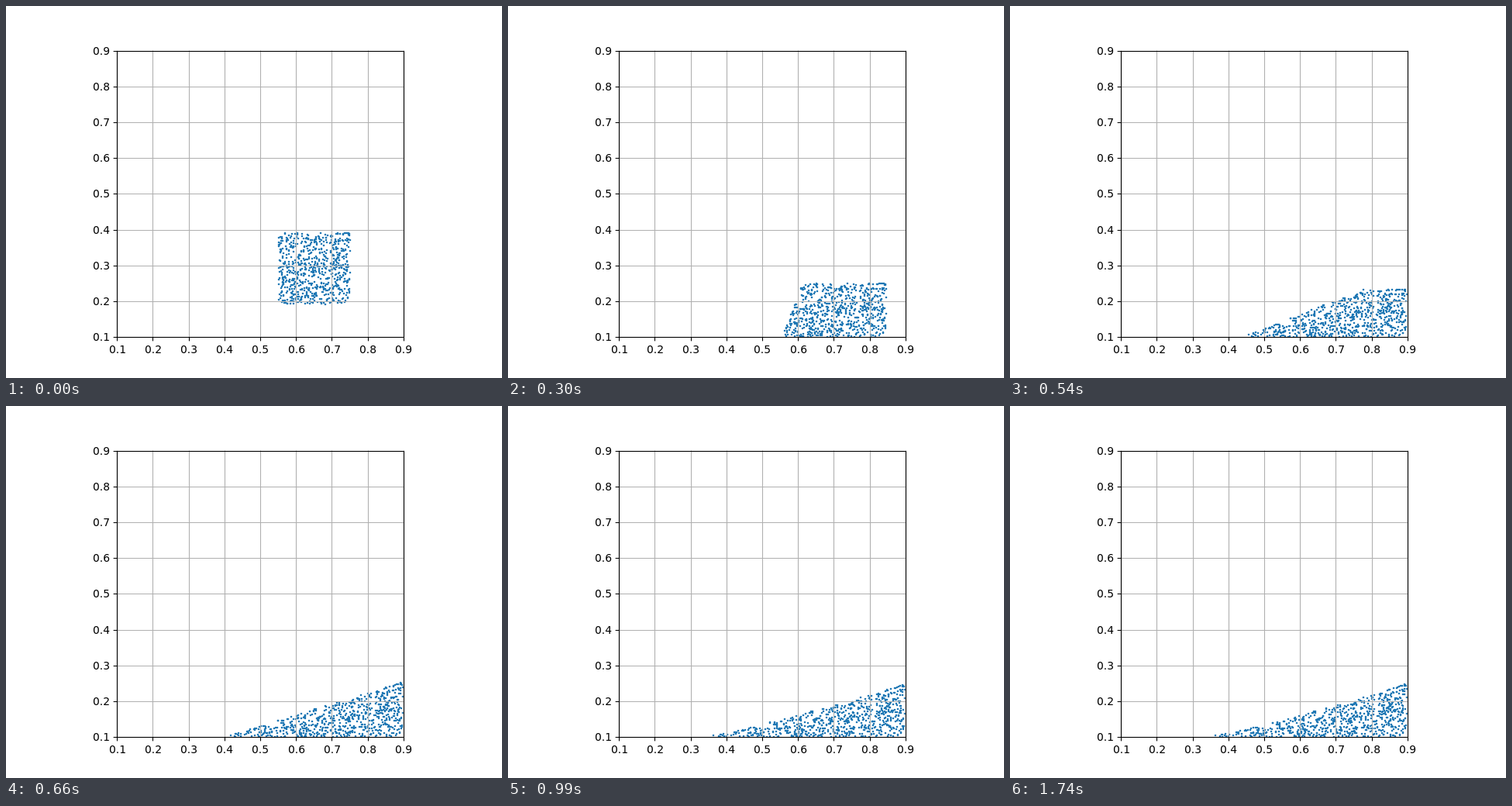
An HTML page with a canvas that plays this animation: 640x480 px, repeating every 2100 ms.

```html
<!DOCTYPE html>
<html lang="en">
<head>
<meta charset="utf-8">
<title>Sand block collapse</title>
<style>
html, body { margin: 0; width: 100%; height: 100%; overflow: hidden; background: #fff; }
canvas { display: block; }
</style>
</head>
<body>
<canvas id="stage" width="640" height="480"></canvas>
<script>
const ctx = document.getElementById('stage').getContext('2d');
const LEFT = 143.2, TOP = 57.6, SIZE = 369.6, RIGHT = LEFT + SIZE, BOTTOM = TOP + SIZE;
const STEP = 30, LOOP = 2100, LAST = 58, LANDING = 7;
const FLOOR = 0.1, WALL = 0.898, SPEED = 0.0082;
const LABEL_WIDTH = 22.09;
const ticks = Array.from({ length: 9 }, (_, i) => (i + 1) / 10);

const px = x => LEFT + (x - 0.1) / 0.8 * SIZE;
const py = y => BOTTOM - (y - 0.1) / 0.8 * SIZE;
const snap = v => Math.round(v) + 0.5;
const mix = (a, b, p) => a + (b - a) * p;
const clamp = v => Math.max(0, Math.min(1, v));

// Seeded random generator (mulberry32)
let seed = 20;
function random() {
  seed = seed + 0x6D2B79F5 | 0;
  let r = Math.imul(seed ^ seed >>> 15, 1 | seed);
  r = r + Math.imul(r ^ r >>> 7, 61 | r) ^ r;
  return ((r ^ r >>> 14) >>> 0) / 4294967296;
}
const grains = Array.from({ length: 720 }, () => [random(), random()]);

// The sand is a ramp of height (s / ramp) ^ power, then a plateau.
// The block has no ramp; after landing the ramp grows to the whole width.
function sandAt(n) {
  const flight = Math.min(n, LANDING), slide = Math.max(0, n - LANDING);
  const start = 0.5515 + SPEED * flight;
  const spread = 1 - (1 - clamp(slide / 29)) ** 2;
  const ramp = clamp(slide / 15);
  const power = 1 + 0.2 * clamp((slide - 15) / 14);
  const left = mix(start, 0.333, spread);
  const right = mix(start + 0.2, WALL, clamp(slide / 7));
  const rampArea = ramp / (power + 1);
  const area = rampArea + 1 - ramp;
  return {
    left, ramp, power, rampArea, area,
    width: right - left,
    height: mix(0.04, 0.0385, ramp) / area / (right - left),
    base: Math.max(FLOOR, 0.192 - 0.0085 * flight - 0.00067 * flight ** 2)
  };
}

// Spreads the grains evenly over the area below the surface
function drawGrains(n) {
  const { left, ramp, power, rampArea, area, width, height, base } = sandAt(n);
  ctx.save();
  ctx.beginPath();
  ctx.rect(LEFT, TOP, SIZE, SIZE);
  ctx.clip();
  ctx.fillStyle = '#1f77b4';
  for (const [u, v] of grains) {
    const q = u * area, onRamp = q < rampArea;
    const s = onRamp ? ramp * (q / rampArea) ** (1 / (power + 1)) : ramp + q - rampArea;
    const top = onRamp ? height * (s / ramp) ** power : height;
    ctx.beginPath();
    ctx.arc(Math.round(px(left + s * width)), Math.round(py(base + v * top)), 1.3, 0, 7);
    ctx.fill();
  }
  ctx.restore();
}

function line(x1, y1, x2, y2) {
  ctx.beginPath();
  ctx.moveTo(x1, y1);
  ctx.lineTo(x2, y2);
  ctx.stroke();
}

function drawAxes() {
  ctx.lineWidth = 1.11;
  ctx.strokeStyle = '#b0b0b0';
  for (const t of ticks) {
    line(snap(px(t)), TOP, snap(px(t)), BOTTOM);
    line(LEFT, snap(py(t)), RIGHT, snap(py(t)));
  }
  ctx.strokeStyle = ctx.fillStyle = '#000';
  ctx.strokeRect(snap(LEFT), snap(TOP), snap(RIGHT) - snap(LEFT), snap(BOTTOM) - snap(TOP));
  ctx.font = '13.89px "DejaVu Sans", sans-serif';
  for (const t of ticks) {
    const x = snap(px(t)), y = snap(py(t)), label = t.toFixed(1);
    line(x, snap(BOTTOM), x, snap(BOTTOM) + 4.86);
    line(snap(LEFT) - 4.86, y, snap(LEFT), y);
    ctx.fillText(label, Math.ceil(px(t) - LABEL_WIDTH / 2), 448);
    ctx.fillText(label, 112, Math.round(py(t)) + 5);
  }
}

function draw() {
  const n = Math.min(LAST, Math.floor(performance.now() % LOOP / STEP));
  ctx.fillStyle = '#fff';
  ctx.fillRect(0, 0, 640, 480);
  drawGrains(n);
  drawAxes();
  requestAnimationFrame(draw);
}
draw();
</script>
</body>
</html>
```
